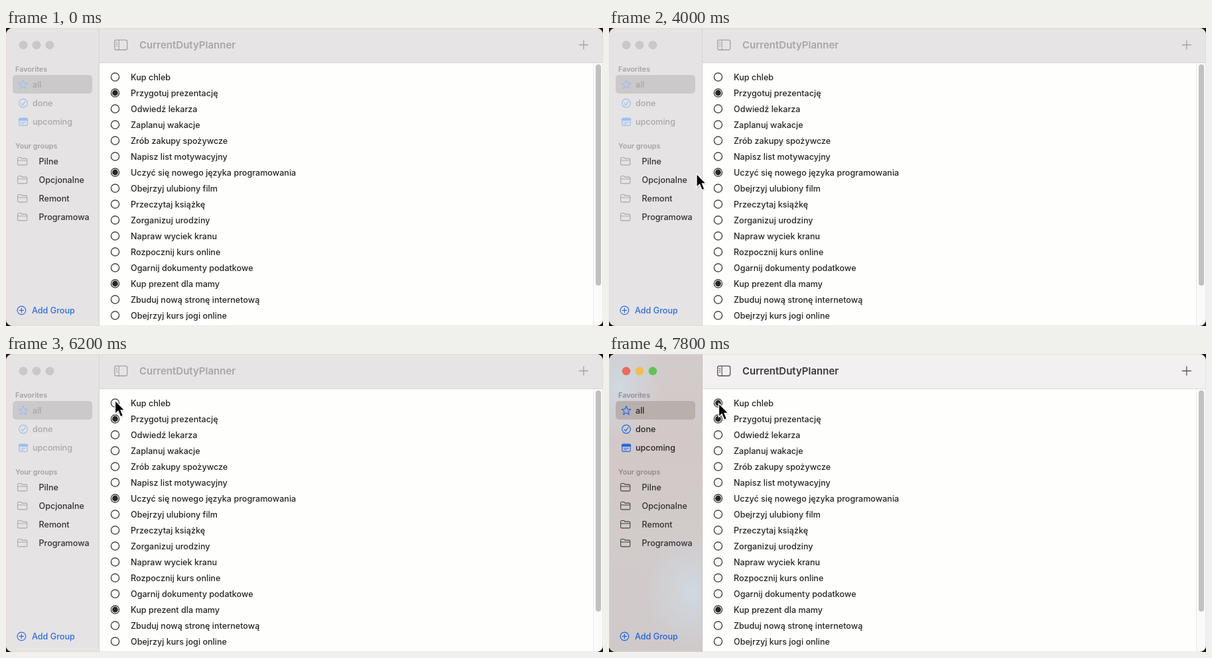
An HTML page for the animation above (8 s loop, 900x450 px).

```html
<!DOCTYPE html>
<html lang="pl">
<head>
<meta charset="utf-8">
<style>
html, body { margin: 0; width: 100%; height: 100%; overflow: hidden; background: #1d1715; }
svg { display: block; width: 900px; height: 450px; font: 450 12.6px Inter, "Open Sans", sans-serif;
  --bar: #e6e4e4; --title: #a8a5a6; --tool: #a3a1a1; --item: #a9a7a8; --head: #a5a2a3;
  --blue: #9cbff2; --folder: #a9a7a7; --sel: #cbc9ca; --add: #2f6ce0; --line: #d6d4d4; --edge: #d6d4d4; }
svg.active { --bar: #f3f0f1; --title: #3c393a; --tool: #535051; --item: #292627; --head: #928b8b;
  --blue: #2467e3; --folder: #464142; --sel: #b9b0ae; --add: #2062db; --line: #dddada; --edge: #c6bfbf; }
.tint { display: none; }
.active .tint { display: inline; }
.head { font-size: 10.8px; font-weight: 600; fill: var(--head); }
.item { fill: var(--item); }
.blue, .folder, .tool { fill: none; stroke-linejoin: round; stroke-linecap: round; }
.blue { stroke: var(--blue); stroke-width: 1.2; }
.folder { stroke: var(--folder); stroke-width: 1.1; }
.tool { stroke: var(--tool); stroke-width: 1.3; }
.ring { fill: none; stroke: #2a2a2a; stroke-width: 1.2; }
</style>
</head>
<body>
<svg id="app" viewBox="0 0 900 450">
  <defs>
    <clipPath id="win"><rect width="900" height="450" rx="10"/></clipPath>
    <clipPath id="side"><rect width="141" height="450"/></clipPath>
    <linearGradient id="base" x2="0" y2="1">
      <stop stop-color="#d3cbcb"/><stop offset=".3" stop-color="#d2c8c7"/>
      <stop offset=".62" stop-color="#d1cbca"/><stop offset="1" stop-color="#cfc9ca"/>
    </linearGradient>
    <radialGradient id="glow"><stop stop-color="#d0d8e0"/><stop offset="1" stop-color="#d0d8e0" stop-opacity="0"/></radialGradient>
  </defs>
  <g clip-path="url(#win)">
    <rect width="900" height="450" fill="#fefefd"/>
    <rect width="141" height="450" fill="#e5e3e4"/>
    <g class="tint" clip-path="url(#side)">
      <rect width="141" height="450" fill="url(#base)"/>
      <ellipse cx="125" cy="360" rx="75" ry="85" fill="url(#glow)"/>
      <ellipse cx="15" cy="50" rx="65" ry="80" fill="url(#glow)"/>
    </g>
    <rect x="141" width="759" height="52" fill="var(--bar)"/>
    <path d="M141 52.5H900" stroke="var(--line)"/>
    <path d="M140.5 0V450" stroke="var(--edge)"/>
    <rect x="885" y="53" width="15" height="397" fill="#fafafa"/>
    <path d="M885.5 53V450" stroke="#e9e9e9"/>
    <rect x="889" y="55" width="8" height="334" rx="4" fill="#c1c1c1"/>

    <g id="lights"></g>
    <g class="tool">
      <rect x="163.7" y="18.2" width="19" height="14.8" rx="2.5"/>
      <path d="M170.2 18.5V33M166 21.8h2M166 24.5h2M166 27.2h2" stroke-width="1.1"/>
      <path d="M864.3 25.5h13M870.8 19v13"/>
    </g>
    <text x="201" y="31" font-size="15" font-weight="600" fill="var(--title)">CurrentDutyPlanner</text>

    <text class="head" x="14" y="65.5">Favorites</text>
    <text class="head" x="14" y="181.5">Your groups</text>
    <rect x="10" y="71" width="120" height="28" rx="5" fill="var(--sel)"/>
    <path id="star" class="blue"/>
    <g class="blue">
      <circle cx="26" cy="113.5" r="6.3"/>
      <path d="M23.2 114l2 2.3 3.6-5.2"/>
      <rect x="19.8" y="136" width="12.4" height="11.3" rx="2"/>
      <path d="M20.6 138h10.8" stroke-width="4"/>
      <path d="M22.5 142.3h7M22.5 144.7h4.5" stroke-width="1"/>
    </g>
    <g class="item">
      <text x="40" y="90">all</text><text x="40" y="118">done</text><text x="40" y="146">upcoming</text>
    </g>
    <g id="groups" fill="#343132"></g>
    <g fill="none" stroke="var(--add)" stroke-width="1.2" stroke-linecap="round">
      <circle cx="23.4" cy="426.4" r="6.3"/><path d="M20.2 426.4h6.4M23.4 423.2v6.4"/>
    </g>
    <text x="39" y="431" fill="var(--add)">Add Group</text>
    <g id="tasks" fill="#262626"></g>
    <rect x=".5" y=".5" width="899" height="449" rx="10" fill="none" stroke="#e9d6d0" stroke-opacity=".6"/>
  </g>
  <g id="cursor">
    <path d="M1 2V22.5L5.6 18.2 9.2 26.5 13 24.8 9.5 16.8H15.5Z" fill="#000" opacity=".15"/>
    <path d="M0 0V20.5L4.6 16.2 8.1 24.8 12 23.2 8.5 15H14.5Z" fill="#000" stroke="#fff" stroke-width="1.3"/>
  </g>
</svg>
<script>
const $ = id => document.getElementById(id);
const LOOP = 8000, STEP = 200, FOCUS = 6400, CHECK = 7800;
const lights = ["#ec6a5e", "#f4be4f", "#61c454"];
const groups = ["Pilne", "Opcjonalne", "Remont", "Programowa"];
const tasks = ["Kup chleb", "*Przygotuj prezentację", "Odwiedź lekarza", "Zaplanuj wakacje",
  "Zrób zakupy spożywcze", "Napisz list motywacyjny", "*Uczyć się nowego języka programowania",
  "Obejrzyj ulubiony film", "Przeczytaj książkę", "Zorganizuj urodziny", "Napraw wyciek kranu",
  "Rozpocznij kurs online", "Ogarnij dokumenty podatkowe", "*Kup prezent dla mamy",
  "Zbuduj nową stronę internetową", "Obejrzyj kurs jogi online"];
// pointer tip: [from ms, x, y]
const path = [[3400, 83.5, 353.5], [3800, 104, 305], [4000, 132, 220], [4200, 152, 150], [4400, 162, 114],
  [4600, 165.5, 102], [4800, 175, 82], [5000, 174, 73], [5200, 164.5, 70], [6400, 165.5, 73], [7400, 165.5, 74.5]];

$("lights").innerHTML = lights.map((c, i) =>
  `<circle cx="${26 + 20 * i}" cy="25.8" r="6" fill="#cac8c8" stroke="#bfbdbd" stroke-width=".6"/>
   <circle class="tint" cx="${26 + 20 * i}" cy="25.8" r="6.2" fill="${c}"/>`).join("");

$("groups").innerHTML = groups.map((name, i) => {
  const y = 201 + 28 * i;
  return `<path class="folder" d="M17.6 ${y - 3.8}q0-1.7 1.7-1.7h3.2l1.6 1.6h6q1.7 0 1.7 1.7v6.4q0 1.7-1.7 1.7H19.3q-1.7 0-1.7-1.7ZM17.6 ${y - 1}h14.2"/>
    <text x="49.5" y="${y + 5}">${name}</text>`;
}).join("");

$("tasks").innerHTML = tasks.map((name, i) => {
  const y = 74 + 24 * i, done = name[0] == "*";
  return `<circle class="ring" cx="164.5" cy="${y}" r="6.1"/>
    <circle class="dot" cx="164.5" cy="${y}" r="4.4" opacity="${+done}"/>
    <text x="188" y="${y + 5}">${name.replace("*", "")}</text>`;
}).join("");

$("star").setAttribute("d", "M" + Array.from({ length: 10 }, (_, i) => {
  const r = i % 2 ? 3.1 : 7.2, a = i * Math.PI / 5;
  return `${26 + r * Math.sin(a)} ${85.7 - r * Math.cos(a)}`;
}).join("L") + "Z");

const firstDot = document.querySelector(".dot");
function draw(now) {
  const t = Math.floor(now % LOOP / STEP) * STEP;
  const pos = path.filter(p => p[0] <= t).pop();
  $("app").classList.toggle("active", t >= FOCUS);
  firstDot.setAttribute("opacity", +(t >= CHECK));
  $("cursor").setAttribute("visibility", pos ? "visible" : "hidden");
  if (pos) $("cursor").setAttribute("transform", `translate(${pos[1]} ${pos[2]})`);
  requestAnimationFrame(draw);
}
draw(performance.now());
</script>
</body>
</html>
```
